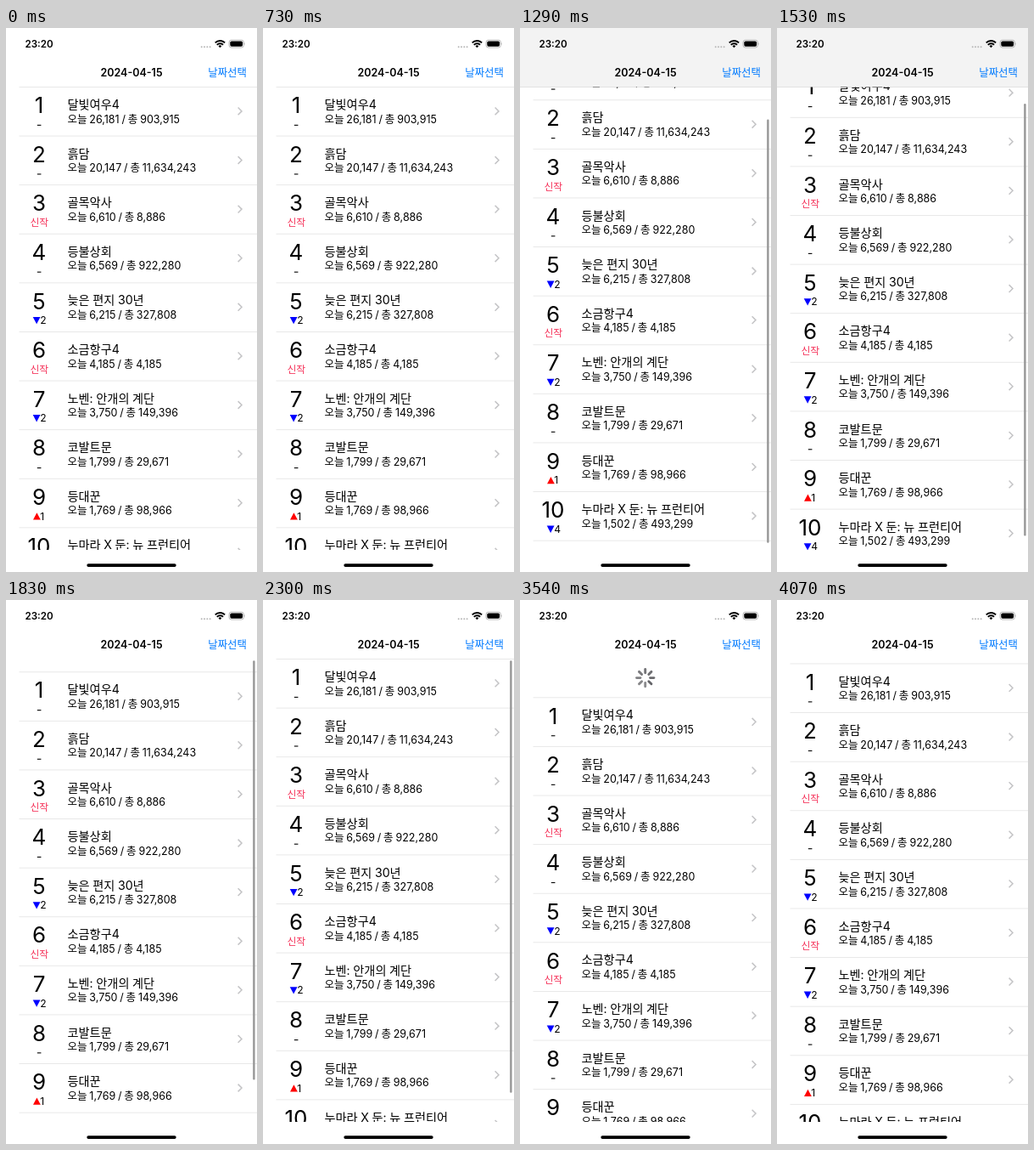
These frames come from a looping animation (296x640 px, 5220 ms). An HTML page:

```html
<!DOCTYPE html>
<html lang="ko">
<head>
<meta charset="utf-8">
<title>Daily ranking</title>
<style>
  html, body { margin: 0; width: 100%; height: 100%; overflow: hidden; background: #fff; }
  svg { display: block; width: 100%; height: 100%; }
  text { font-family: Inter, "Noto Sans CJK KR", "Noto Sans CJK JP", "Noto Sans CJK", sans-serif; }
  .rank { font-size: 26px; text-anchor: middle; }
  .name { font-size: 14.2px; word-spacing: -.4px; }
  .info { font-size: 12.5px; word-spacing: -.7px; }
  .move { font-size: 12.1px; }
  .fresh { font-size: 11.8px; text-anchor: middle; fill: #f52d55; }
  .bold { font-weight: 600; }
</style>
</head>
<body>
<svg viewBox="0 0 296 640" xmlns="http://www.w3.org/2000/svg">
  <defs>
    <clipPath id="view"><rect y="69" width="296" height="545"/></clipPath>
  </defs>
  <rect width="296" height="640" fill="#fff"/>
  <g clip-path="url(#view)">
    <g id="spinner" stroke="#5c5c60" stroke-width="2.9" stroke-linecap="round"></g>
    <g id="list"></g>
  </g>
  <rect id="thumb" x="291.2" width="2.4" rx="1.2" fill="#969696"/>
  <g id="bar">
    <rect width="296" height="69" fill="#f3f3f3"/>
    <rect y="69" width="296" height=".6" fill="#cfcfcf"/>
  </g>
  <text class="bold" x="22.5" y="23.2" font-size="11.6">23:20</text>
  <g fill="#b8b8b8">
    <circle cx="230.7" cy="22.3" r="1"/><circle cx="234" cy="22.3" r="1"/>
    <circle cx="237.3" cy="22.3" r="1"/><circle cx="240.6" cy="22.3" r="1"/>
  </g>
  <g fill="none" stroke="#000" stroke-width="1.9">
    <path d="M246.7 17.4a8 8 0 0 1 11.4 0M248.8 19.8a5 5 0 0 1 7.2 0"/>
    <path d="M252.4 23.2l-1.9-2a2.7 2.7 0 0 1 3.8 0z" fill="#000" stroke="none"/>
  </g>
  <rect x="263" y="14.2" width="17.4" height="8.8" rx="2.8" fill="none" stroke="#a6a6a6" stroke-width=".8"/>
  <rect x="264.3" y="15.5" width="14.8" height="6.2" rx="1.7"/>
  <path d="M281.4 17.2q1.2 1.4 0 2.8z" fill="#a6a6a6"/>
  <text class="bold" x="148" y="56.5" font-size="12.5" text-anchor="middle">2024-04-15</text>
  <text x="238.3" y="56.6" font-size="12.4" fill="#007aff">날짜선택</text>
  <rect x="95.3" y="630.2" width="105.4" height="3.8" rx="1.9"/>
</svg>
<script>
const LOOP = 5220, TOP = 69.5, ROW = 57.6, REST = 45;

// name, today, total, rank change ("new" or a signed number)
const films = [
  ["달빛여우4", "26,181", "903,915", 0],
  ["흙담", "20,147", "11,634,243", 0],
  ["골목악사", "6,610", "8,886", "new"],
  ["등불상회", "6,569", "922,280", 0],
  ["늦은 편지 30년", "6,215", "327,808", -2],
  ["소금항구4", "4,185", "4,185", "new"],
  ["노벤: 안개의 계단", "3,750", "149,396", -2],
  ["코발트문", "1,799", "29,671", 0],
  ["등대꾼", "1,769", "98,966", 1],
  ["누마라 X 둔: 뉴 프런티어", "1,502", "493,299", -4]
];

const $ = id => document.getElementById(id);
const clamp = v => Math.min(1, Math.max(0, v));
const ease = v => (1 - Math.cos(Math.PI * clamp(v))) / 2;
const spring = ms => { const x = 0.0173 * Math.max(0, ms); return (1 + x) * Math.exp(-x); };

function change(c) {
  if (c === "new") return '<text class="fresh" x="39.3" y="48.2">신작</text>';
  if (!c) return '<rect x="36.8" y="44.3" width="4.6" height="1.1"/>';
  const tri = c < 0 ? '<path d="M31.7 40h8.8l-4.4 8.3z" fill="#00f"/>'
                    : '<path d="M32 48.2h8.8l-4.4-8.3z" fill="#f00"/>';
  return `${tri}<text class="move" x="40.3" y="48.3">${Math.abs(c)}</text>`;
}

const line = '<rect x="15.5" y="-.5" width="280.5" height=".9" fill="#e6e6e6"/>';

$("list").innerHTML = films.map(([name, today, total, c], i) =>
  `<g transform="translate(0 ${i * ROW})">${line}
    <text class="rank" x="39" y="30.7">${i + 1}</text>${change(c)}
    <text class="name" x="72.5" y="25.6">${name}</text>
    <text class="info" x="72.5" y="42.1">오늘 ${today} / 총 ${total}</text>
    <path d="M273.6 24l4.4 4.4-4.4 4.4" fill="none" stroke="#c4c4c6" stroke-width="1.5"/>
  </g>`).join("") + `<g transform="translate(0 ${films.length * ROW})">${line}</g>`;

$("spinner").innerHTML = Array.from({ length: 8 }, (_, i) =>
  `<path d="M0-5.8V-10.2" transform="rotate(${i * 45})"/>`).join("");
const spokes = [...$("spinner").children];

// The screen refreshes at these moments only.
const ticks = [0, 730, 840, 950, 1060, 1170, 1290, 1400, 1510, 1620, 1730, 1830, 1940, 2050,
  2160, 2300, 2840, 2950, 3070, 3180, 3300, 3420, 3530, 3640, 3750, 3860, 3960, 4070];

// Vertical shift of the list: drag up, drag down, bounce, pull to refresh, release.
function shift(t) {
  if (t < 1290) return -42.3 * ease((t - 730) / 560);
  if (t < 1830) return -42.3 + 57.6 * ease((t - 1290) / 540);
  if (t < 2790) return 15.3 * spring(t - 1830);
  if (t < 3070) return 166.5 * ease((t - 2790) / 280);
  if (t < 3860) return REST + (166.5 - REST) * spring(t - 3070);
  return REST * spring(t - 3860);
}

function draw(ms) {
  const t = ticks.findLast(v => v <= ms);
  const y = shift(t);
  $("list").setAttribute("transform", `translate(0 ${TOP + y})`);
  $("bar").setAttribute("opacity", clamp(-y / 8));

  // Scroll indicator: travels with the list and shrinks past either end.
  const max = 32, over = Math.max(0, y, -y - max);
  const top = 71.3 + 26 * clamp(-y / max) + (y < -max ? over : 0);
  $("thumb").setAttribute("y", top);
  $("thumb").setAttribute("height", 508.5 - over);
  $("thumb").setAttribute("opacity", t > 730 && t < 2840 ? 1 : 0);

  // Spokes appear one by one while pulling, then turn, then shrink away.
  const gone = clamp((t - 3860) / 200);
  $("spinner").setAttribute("transform", `translate(147.7 91.6) scale(${1 - gone})`);
  $("spinner").setAttribute("opacity", t < 2840 ? 0 : 1 - gone);
  const step = Math.floor((t - 3070) / 125);
  spokes.forEach((s, i) => {
    const age = (step - i + 80) % 8;
    s.setAttribute("opacity", t < 3070 ? clamp(y / 12.5 - i) * 0.8 : 0.95 - age * 0.035);
  });
}

function frame() {
  draw(performance.now() % LOOP);
  requestAnimationFrame(frame);
}
frame();
</script>
</body>
</html>
```
